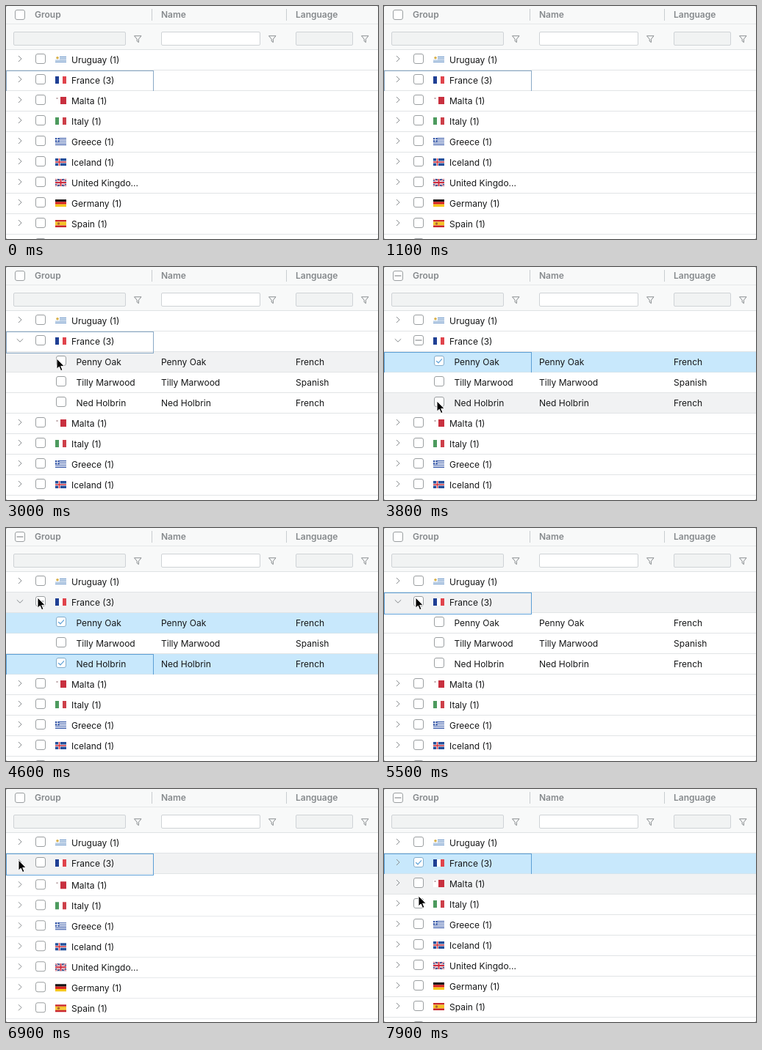
Write an HTML page that moves like this. It is 506x318 px and loops after 8000 ms.

```html
<!DOCTYPE html>
<html lang="en">
<head>
<meta charset="utf-8">
<title>Grouped grid</title>
<style>
  html, body { margin: 0; width: 100%; height: 100%; overflow: hidden; background: #a3a8ab; }
  #grid {
    position: relative; width: 506px; height: 318px; overflow: hidden;
    border-radius: 3px; background: #fff;
    font: 12px/27px Inter, "Open Sans", sans-serif; color: #161718;
  }
  #grid * { box-sizing: border-box; }
  #head { position: absolute; inset: 0 0 auto; height: 60px; background: #f8f9f9; border-bottom: 1px solid #dfe2e4; z-index: 3; }
  #head::after { content: ""; position: absolute; left: 0; right: 0; top: 24px; border-top: 1px solid #e6e8e9; }
  #head b { position: absolute; top: -2px; font-weight: 600; color: #85898c; }
  #head i { position: absolute; top: 4px; width: 1px; height: 16px; background: #c9cdd0; }
  .field { position: absolute; top: 35px; height: 19px; border: 1px solid #cfd3d6; border-radius: 2px; background: #f1f3f3; }
  .field.open { background: #fff; }
  .row { position: absolute; left: 0; top: 0; width: 506px; height: 28px; background: #fff; border-bottom: 1px solid #e1e4e6; z-index: 2; }
  .row.child { z-index: 1; }
  .row.hover { background: #f1f2f3; }
  .row.picked { background: #c8e8fc; border-color: #d3e4ee; }
  .row span { position: absolute; top: 0; white-space: pre; }
  .row.focus::after {
    content: ""; position: absolute; left: 0; top: 0; width: 199px; height: 28px;
    border: 1px solid #8aa9c6;
  }
  .row.focus.hover::after, .row.focus.picked::after { border-color: #5c9fd6; }
  svg { position: absolute; overflow: visible; fill: none; }
  .box rect { fill: #fff; stroke: #9b9fa1; }
  .box path { display: none; stroke-width: 1.2; }
  .box .tick { stroke: #5fa3d8; }
  .box .dash { stroke: #74797c; }
  .box.on rect { stroke: #86aecb; }
  .box.on .tick, .box.part .dash { display: block; }
  .arrow, .funnel { stroke: #888c8f; }
  #mouse { left: 0; top: 0; z-index: 5; }
</style>
</head>
<body>
<div id="grid">
  <div id="head"></div>
  <svg id="mouse" width="12" height="18">
    <path d="M0 0V14.2L3.3 11.2L5.6 16.6L8 15.6L5.7 10.4H10.2Z" fill="#000" stroke="#fff" stroke-width="1" stroke-linejoin="round"/>
  </svg>
</div>
<script>
const LOOP = 8000, TOP = 60, ROW = 28;
const grid = document.getElementById('grid');
const head = document.getElementById('head');
const mouse = document.getElementById('mouse');

const svg = (x, y, cls, body) =>
  `<svg class="${cls}" style="left:${x}px;top:${y}px" width="15" height="14">${body}</svg>`;
const box = (x, y) => svg(x, y, 'box',
  '<rect x=".5" y=".5" width="13" height="13" rx="2.5"/>' +
  '<path class="tick" d="M3.2 7.2L6 9.8L11 4.4"/><path class="dash" d="M2.5 7H11.5"/>');
const funnel = x => svg(x, 40, 'funnel', '<path d="M.5 .8H10L6.4 5.2V9.6L4.2 8V5.2Z"/>');

// Flags on a 15 by 10 field
const rect = (c, x, y, w, h) => `<rect fill="${c}" x="${x}" y="${y}" width="${w}" height="${h}"/>`;
const dot = (c, x, y, r) => `<circle fill="${c}" cx="${x}" cy="${y}" r="${r}"/>`;
const line = (c, w, d) => `<path stroke="${c}" stroke-width="${w}" d="${d}"/>`;
const bars = (...cs) => cs.map((c, i) => rect(c, i * 5, 0, 5, 10)).join('');
const bands = (...cs) => cs.map((c, i) => rect(c, 0, i * 10 / cs.length, 15, 10 / cs.length)).join('');
const stripes = (a, b) => bands(...Array.from({ length: 9 }, (_, i) => i % 2 ? b : a));
const plus = 'M0 5H15M7.5 0V10', nordic = 'M0 5H15M5.5 0V10', diag = 'M0 0L15 10M15 0L0 10';

const flags = {
  uruguay: stripes('#fff', '#4d80bd') + rect('#fff', 0, 0, 6, 5.5) + dot('#d8b04a', 3, 2.8, 1.8),
  france: bars('#1f3f94', '#fff', '#e0444c'),
  malta: rect('#fff', 0, 0, 7, 10) + rect('#c8303f', 7, 0, 8, 10) + rect('#b9a3a6', 1.5, 1, 2, 2),
  italy: bars('#4d9a5e', '#fff', '#cd3f49'),
  greece: stripes('#2c4fa3', '#fff') + rect('#2c4fa3', 0, 0, 5.6, 5.6) + line('#fff', 1.1, 'M0 2.8H5.6M2.8 0V5.6'),
  iceland: rect('#22509c', 0, 0, 15, 10) + line('#fff', 3, nordic) + line('#d2343f', 1.5, nordic),
  uk: rect('#24397e', 0, 0, 15, 10) + line('#fff', 2, diag) + line('#cf2b3d', .8, diag) +
    line('#fff', 3.4, plus) + line('#cf2b3d', 2, plus),
  germany: bands('#111', '#d8221f', '#f5c71a'),
  spain: bands('#c9252c', '#f4c326', '#f4c326', '#c9252c') + dot('#b0672f', 4.5, 5, 1.7)
};

head.innerHTML = box(12, 5) +
  [[39, 'Group'], [211, 'Name'], [394, 'Language']].map(([x, s]) => `<b style="left:${x}px">${s}</b>`).join('') +
  [198, 381].map(x => `<i style="left:${x}px"></i>`).join('') +
  [[10, 153, ''], [211, 135, 'open'], [394, 78, '']].map(([x, w, c]) =>
    `<div class="field ${c}" style="left:${x}px;width:${w}px"></div>`).join('') +
  [174, 357, 483].map(funnel).join('');

const text = (x, s) => `<span style="left:${x}px">${s}</span>`;
function addRow(cls, html) {
  const el = document.createElement('div');
  el.className = 'row ' + cls;
  el.innerHTML = html;
  grid.insertBefore(el, mouse);
  return { el, box: el.querySelector('.box'), arrow: el.querySelector('.arrow path') };
}
const groups = [
  ['Uruguay (1)', 'uruguay'], ['France (3)', 'france'], ['Malta (1)', 'malta'],
  ['Italy (1)', 'italy'], ['Greece (1)', 'greece'], ['Iceland (1)', 'iceland'],
  ['United Kingdo...', 'uk'], ['Germany (1)', 'germany'], ['Spain (1)', 'spain'], ['Ireland (1)', '']
].map(([name, flag]) => addRow('', svg(14, 5, 'arrow', '<path/>') + box(40, 5) +
  svg(67, 8, 'flag', flags[flag] || '') + text(89, name)));
const kids = [
  ['Penny Oak', 'French'], ['Tilly Marwood', 'Spanish'], ['Ned Holbrin', 'French']
].map(([name, lang]) => addRow('child', box(68, 5) + text(95.5, name) + text(211, name) + text(394, lang)));
const rows = [...groups, ...kids];
const france = groups[1], [penny, tilly, ned] = kids;
const headBox = head.querySelector('.box');

// Pointer stops: time, x, y
const path = [
  [2000, 17, 103], [2350, 17, 103], [2850, 68, 124], [3000, 69, 125], [3250, 69, 125],
  [3800, 72, 183], [4050, 72, 183], [4560, 43, 95], [5800, 43, 95], [6100, 22, 91],
  [6300, 17, 97], [6900, 17, 97], [7300, 44, 98], [7650, 44, 98], [7920, 47, 146.5]
];
const OPEN = 2035, CLOSE = 6601, HOVER_LAG = 120;

const clamp = v => Math.min(1, Math.max(0, v));
const smooth = u => u * u * (3 - 2 * u);
const within = (t, a, b) => t >= a && t < b;

// The CSS "ease" curve
function ease(x) {
  if (x <= 0 || x >= 1) return clamp(x);
  let a = 0, b = 1, s;
  const curve = (p, q) => 3 * (1 - s) * (1 - s) * s * p + 3 * (1 - s) * s * s * q + s * s * s;
  for (let i = 0; i < 20; i++) {
    s = (a + b) / 2;
    if (curve(.25, .25) < x) a = s; else b = s;
  }
  return curve(.1, 1);
}

function pointer(t) {
  const i = path.findIndex(p => p[0] > t);
  if (i < 1) return (i ? path[path.length - 1] : path[0]).slice(1);
  const [t0, x0, y0] = path[i - 1], [t1, x1, y1] = path[i];
  const u = smooth((t - t0) / (t1 - t0));
  return [x0 + (x1 - x0) * u, y0 + (y1 - y0) * u];
}

function focusAt(t) {
  if (within(t, 3200, 3900)) return penny;
  return within(t, 3900, 4800) ? ned : france;
}

function render(t) {
  const spread = ease((t - OPEN) / 400) - ease((t - CLOSE) / 380);
  const fade = clamp((t - 2100) / 200) - clamp((t - CLOSE) / 150);
  groups.forEach((r, i) => { r.y = TOP + i * ROW + (i > 1 ? spread * 3 * ROW : 0); });
  kids.forEach((r, i) => {
    r.y = TOP + (i + 2) * ROW;
    r.el.style.opacity = fade;
    r.el.style.visibility = fade > 0 ? 'visible' : 'hidden';
  });

  const picked = new Set();
  if (within(t, 3200, 5500)) picked.add(penny);
  if (within(t, 3900, 5500)) picked.add(ned);
  if (within(t, 4800, 5500)) picked.add(tilly).add(france);
  if (t >= 7500) picked.add(france);

  const shown = t >= path[0][0];
  const [x, y] = pointer(t);
  const late = pointer(t - HOVER_LAG)[1];
  const over = shown && rows.find(r => late >= r.y && late < r.y + ROW);
  const focus = focusAt(t);

  for (const r of rows) {
    const on = picked.has(r), c = r.el.classList;
    r.el.style.transform = `translateY(${r.y}px)`;
    c.toggle('hover', r === over);
    c.toggle('picked', on);
    c.toggle('focus', r === focus);
    r.box.classList.toggle('on', on);
    if (r.arrow) {
      const open = r === france && within(t, 2000, CLOSE);
      r.arrow.setAttribute('d', open ? 'M.8 5.2L5 9.2L9.2 5.2' : 'M3 3L7 7L3 11');
    }
  }
  france.box.classList.toggle('part', within(t, 3200, 4800));
  headBox.classList.toggle('part', picked.size > 0);

  mouse.style.visibility = shown ? 'visible' : 'hidden';
  mouse.style.transform = `translate(${x}px,${y}px)`;
}

function tick() {
  render(performance.now() % LOOP);
  requestAnimationFrame(tick);
}
tick();
</script>
</body>
</html>
```
